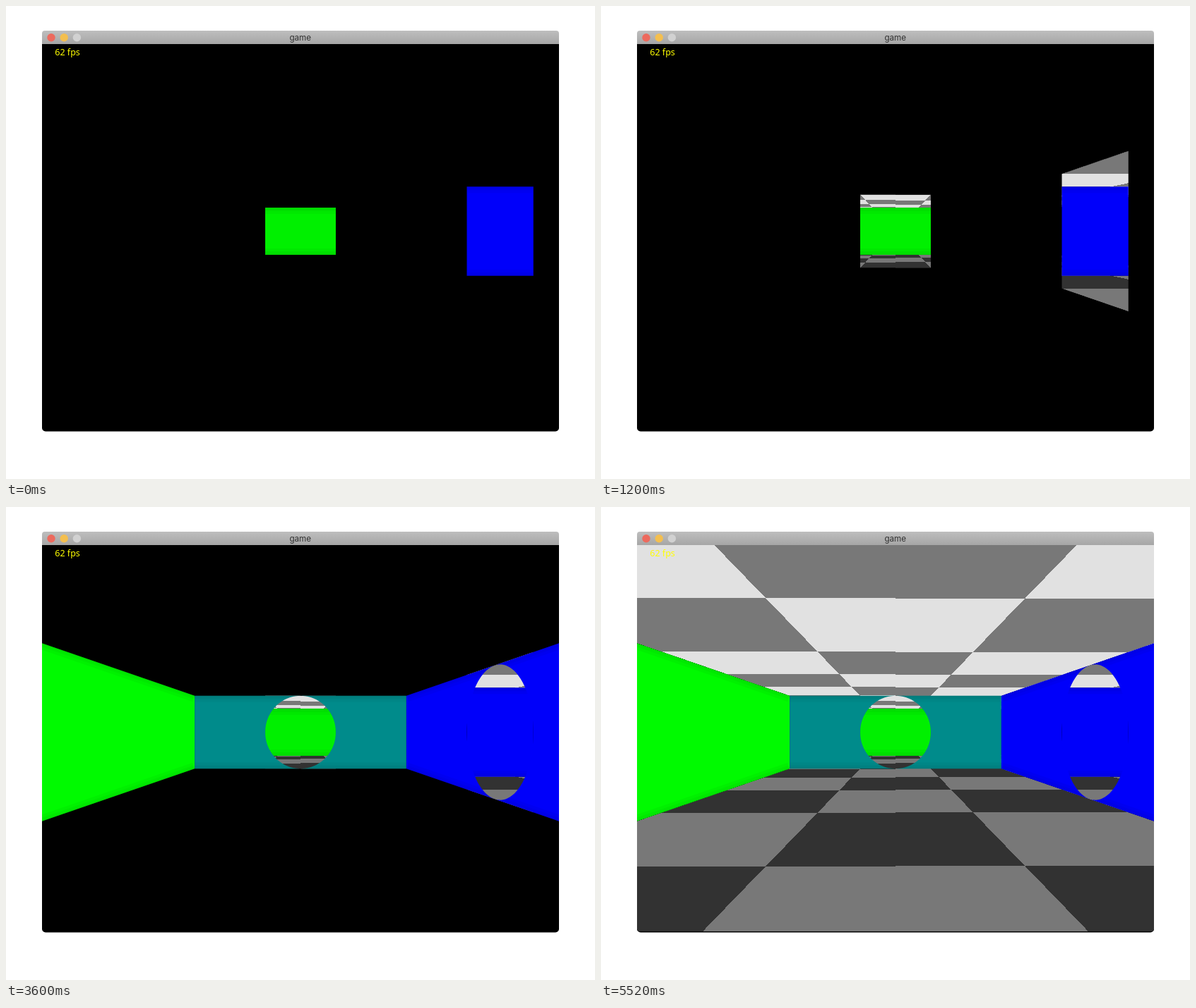
An HTML page with a canvas for the animation above (6000 ms loop, 834 by 671 pixels).

```html
<!DOCTYPE html>
<html lang="en">
<head>
<meta charset="utf-8">
<title>game</title>
<style>
  html, body { margin: 0; width: 100%; height: 100%; overflow: hidden; background: #fff; }
  canvas { display: block; }
</style>
</head>
<body>
<canvas id="stage" width="834" height="671"></canvas>
<script>
const ctx = document.getElementById('stage').getContext('2d');
const CX = 417, CY = 319.5, SX = 274.8, SY = 284.5;  // view centre and perspective scale
const LEFT = 51, TOP = 54, WIDTH = 732, BOTTOM = 602;

const GREEN = '#00fa00', BLUE = '#0000fa', TEAL = '#008b8b';
const project = (x, y, z) => [CX + x * SX / z, CY + y * SY / z];

// A wall stands between two floor points; y runs from -1 (ceiling) to 1 (floor).
const wall = (color, x1, z1, x2, z2, hole) => ({ color, x1, z1, x2, z2, hole });
const circle = point => Array.from({ length: 97 }, (_, i) => {
  const a = i / 48 * Math.PI;
  return project(...point(Math.cos(a), Math.sin(a)));
});
const backHole = circle((c, s) => [c, s, 5.5]);
const sideHole = circle((c, s) => [3, s, 3 + c / 2]);

// Seen through the round windows; their edges line up with the window tiles.
const backTile = wall(TEAL, -1, 5.5, 1, 5.5, backHole);
const sideTile = wall(BLUE, 3, 3.5, 3, 2.5, sideHole);
const farWalls = [
  wall('#00f000', -8.5 / 5.5, 8.5, 8.5 / 5.5, 8.5),
  wall(BLUE, 3 * 4.5 / 3.5, 4.5, 3 * 4.5 / 2.5, 4.5)
];
const roomWalls = [
  wall(GREEN, -3, 2, -3, 5.5),
  wall(TEAL, -3, 5.5, 3, 5.5, backHole),
  wall(BLUE, 3, 5.5, 3, 2, sideHole)
];

function addShape(path, points) {
  points.forEach((p, i) => i ? path.lineTo(...p) : path.moveTo(...p));
  path.closePath();
}

function corners({ x1, z1, x2, z2 }) {
  return [project(x1, -1, z1), project(x2, -1, z2), project(x2, 1, z2), project(x1, 1, z1)];
}

function drawWall(w) {
  const quad = corners(w), path = new Path2D(), edges = new Path2D();
  addShape(path, quad);
  if (w.hole) addShape(path, w.hole);
  ctx.save();
  ctx.fillStyle = w.color;
  ctx.fill(path, 'evenodd');
  // soft shade along the top and bottom
  ctx.clip(path, 'evenodd');
  edges.moveTo(...quad[0]);
  edges.lineTo(...quad[1]);
  edges.moveTo(...quad[3]);
  edges.lineTo(...quad[2]);
  ctx.strokeStyle = 'rgba(0,0,0,.035)';
  for (const width of [18, 10, 4]) {
    ctx.lineWidth = width;
    ctx.stroke(edges);
  }
  ctx.restore();
}

function drawChecker() {
  const bounds = [-3, -1, 0, 1, 3, 5, 7];
  for (let y = TOP; y < BOTTOM; y++) {
    const depth = Math.abs(y + .5 - CY);
    if (depth < 33) continue;
    for (let i = 0; i < bounds.length - 1; i++) {
      const a = bounds[i], b = bounds[i + 1];
      const z = SY / (depth - (a < 0 ? .8 : 0));
      const odd = (Math.floor(z + .5) + Math.floor((a + 1) / 2)) & 1;
      const [l, r] = [a, b].map(x => Math.round(CX + x * SX / SY * depth));
      ctx.fillStyle = odd ? '#787878' : y < CY ? '#e1e1e1' : '#323232';
      ctx.fillRect(l, y, r - l, 1);
    }
  }
}

function drawScene(step) {
  ctx.fillStyle = '#000';
  ctx.fillRect(LEFT, TOP, WIDTH, 550);
  if (step > 0) {
    ctx.save();
    if (step < 4) {
      const openings = new Path2D();
      for (const tile of [backTile, sideTile]) addShape(openings, corners(tile));
      ctx.clip(openings);
    }
    drawChecker();
    ctx.restore();
  }
  farWalls.forEach(drawWall);
  if (step === 2) [backTile, sideTile].forEach(drawWall);
  if (step > 2) roomWalls.forEach(drawWall);
  ctx.fillStyle = '#ff0';
  ctx.font = '12.5px "Noto Sans", sans-serif';
  ctx.textAlign = 'left';
  ctx.fillText('62 fps', 69.3, 70);
}

function drawTitleBar() {
  const shade = ctx.createLinearGradient(0, 35, 0, TOP);
  shade.addColorStop(0, '#bebebe');
  shade.addColorStop(1, '#a6a6a6');
  ctx.fillStyle = shade;
  ctx.fillRect(LEFT, 35, WIDTH, TOP - 35);
  ['#ed6a5e', '#f4bf4f', '#d1d1d1'].forEach((color, i) => {
    ctx.fillStyle = color;
    ctx.beginPath();
    ctx.arc(64 + i * 18.2, 44.8, 5.7, 0, 7);
    ctx.fill();
  });
  ctx.fillStyle = '#303030';
  ctx.font = '11.6px Inter, sans-serif';
  ctx.textAlign = 'center';
  ctx.fillText('game', 416.7, 49);
}

function draw(now) {
  ctx.fillStyle = '#fff';
  ctx.fillRect(0, 0, 834, 671);
  ctx.save();
  ctx.beginPath();
  ctx.roundRect(LEFT, 35, WIDTH, 568.5, [4, 4, 5, 5]);
  ctx.clip();
  drawScene(Math.floor(now % 6000 / 1200));
  drawTitleBar();
  ctx.restore();
}

const start = performance.now();
function tick() {
  draw(performance.now() - start);
  requestAnimationFrame(tick);
}
tick();
</script>
</body>
</html>
```
